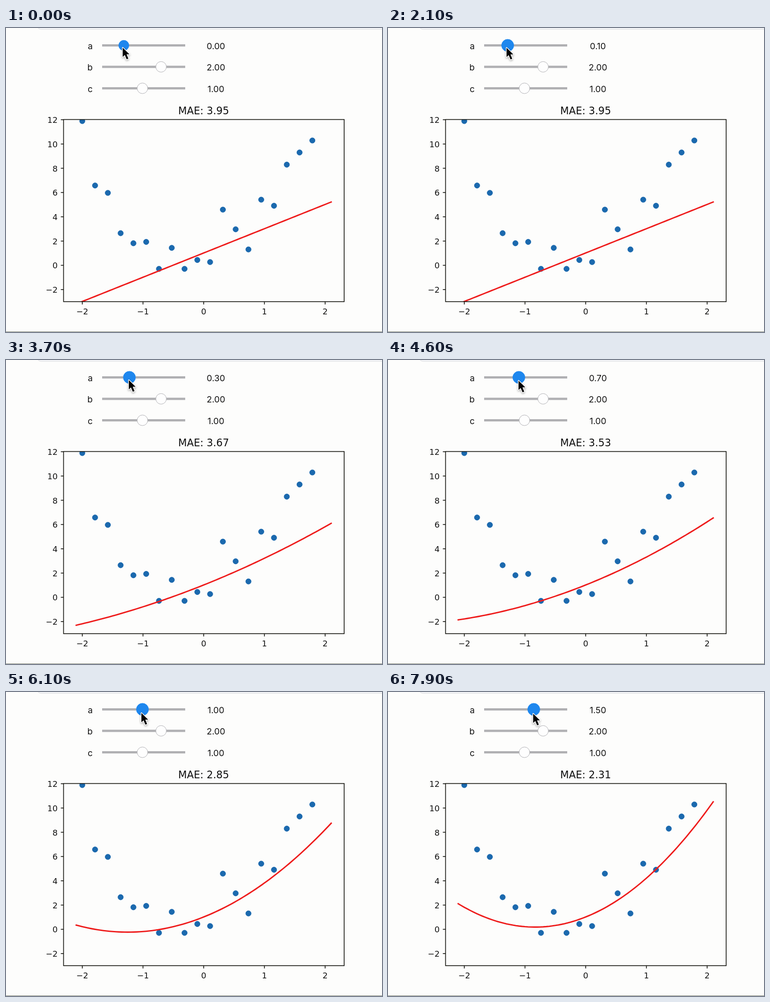
Animation of 833x673 px, one loop 8000 ms. Source, as an HTML page with a canvas:

```html
<!DOCTYPE html>
<html lang="en">
<head>
<meta charset="utf-8">
<title>Fitting a quadratic</title>
<style>
html, body { margin: 0; width: 100%; height: 100%; overflow: hidden; background: #fdfdfc; }
canvas { display: block; }
</style>
</head>
<body>
<canvas width="833" height="673"></canvas>
<script>
const ctx = document.querySelector('canvas').getContext('2d');
const LOOP = 8000, STEP = 100;
const DRAG_START = 2000;

// Measured samples, evenly spaced in x from -2 to 2; the last lies above the axes.
const points = [11.89, 6.58, 5.97, 2.65, 1.82, 1.93, -.29, 1.44, -.29, .44,
  .27, 4.59, 2.97, 1.31, 5.41, 4.91, 8.30, 9.30, 10.29, 13.3]
  .map((y, i) => [-2 + 4 * i / 19, y]);

// The hand nudges the slider, rests, then drags: time, value.
const drag = [[DRAG_START, .1], [3200, .1], [4600, .74], [6000, .97], [7900, 1.52]];

const px = x => 438 + 134.5 * x;
const py = y => 525.4 - 26.86 * y;
const model = (a, x) => a * x * x + 2 * x + 1;
const clamp = (v, min, max) => Math.min(max, Math.max(min, v));
const snap = v => Math.round(v * 10) / 10;

function handAt(t) {
  if (t < DRAG_START) return 0;
  const i = clamp(drag.findLastIndex(k => k[0] <= t), 0, drag.length - 2);
  const [[t1, v1], [t2, v2]] = drag.slice(i, i + 2);
  return v1 + (v2 - v1) * (t - t1) / (t2 - t1);
}

// Redraws fall further behind the slider while it moves.
const plotLag = t => clamp(.75 * (t - 3300), 300, 1000);

function text(str, x, y, font, align = 'center') {
  ctx.font = font;
  ctx.textAlign = align;
  ctx.fillStyle = '#111';
  ctx.fillText(str, x, y);
}

function circle(x, y, r, fill, stroke = fill) {
  ctx.beginPath();
  ctx.arc(x, y, r, 0, 2 * Math.PI);
  ctx.fillStyle = fill;
  ctx.fill();
  ctx.strokeStyle = stroke;
  ctx.lineWidth = 1;
  ctx.stroke();
}

function line(x1, y1, x2, y2) {
  ctx.beginPath();
  ctx.moveTo(x1, y1);
  ctx.lineTo(x2, y2);
  ctx.stroke();
}

function slider(name, value, y, knobRadius, ...colors) {
  const font = '19.3px Inter, "Liberation Sans", sans-serif';
  text(name, 192, y + 8, font, 'right');
  text(value.toFixed(2), 465, y + 8, font);
  ctx.fillStyle = '#b0b0b3';
  ctx.fillRect(213, y - 2.5, 184, 5);
  circle(261 + 41.3 * value, y, knobRadius, ...colors);
}

function pageEdges() {
  ctx.beginPath();
  ctx.roundRect(69.5, -20, 800, 23, 8);
  ctx.fillStyle = '#f5f6f8';
  ctx.fill();
  ctx.strokeStyle = '#d9dade';
  ctx.lineWidth = 1;
  ctx.stroke();
  ctx.fillStyle = '#75786a';
  ctx.fillRect(0, 672, 833, 1);
}

function axes() {
  const font = '18px "DejaVu Sans", sans-serif';
  const label = n => String(n).replace('-', '\u2212');
  ctx.strokeStyle = '#15150f';
  ctx.lineWidth = 1.7;
  ctx.strokeRect(127.5, 202.6, 621.7, 403.2);
  for (let x = -2; x <= 2; x++) {
    line(px(x), 606, px(x), 612);
    text(label(x), px(x), 634, font);
  }
  for (let y = -2; y <= 12; y += 2) {
    line(121.5, py(y), 127.5, py(y));
    text(label(y), 114.5, py(y) + 7, font, 'right');
  }
}

function plot(a) {
  ctx.save();
  ctx.beginPath();
  ctx.rect(127.5, 202.6, 621.7, 403.2);
  ctx.clip();
  for (const [x, y] of points) circle(px(x), py(y), 6, '#1b69ae');
  ctx.beginPath();
  for (let x = -2.1; x < 2.11; x += .05) ctx.lineTo(px(x), py(model(a, x)) - .5);
  ctx.strokeStyle = '#ee1c1c';
  ctx.lineWidth = 3.1;
  ctx.lineCap = 'square';
  ctx.stroke();
  ctx.restore();
  axes();
  const mae = points.reduce((sum, [x, y]) => sum + Math.abs(y - model(a, x)), 0) / points.length;
  text('MAE: ' + mae.toFixed(2), 437.8, 191, '22.3px "DejaVu Sans", sans-serif');
}

const arrow = new Path2D('M1 2v20.5l4.7-4.3 4.1 9.6 3.8-1.6-4-9.4H16z');

function pointer(x, y) {
  ctx.save();
  ctx.translate(x, y);
  ctx.lineJoin = 'round';
  ctx.strokeStyle = '#fff';
  ctx.lineWidth = 3;
  ctx.shadowColor = 'rgba(0,0,0,.35)';
  ctx.shadowBlur = 4;
  ctx.shadowOffsetY = 2;
  ctx.stroke(arrow);
  ctx.shadowColor = 'transparent';
  ctx.fillStyle = '#000';
  ctx.fill(arrow);
  ctx.restore();
}

function draw(now) {
  const t = Math.floor(now % LOOP / STEP) * STEP;
  const hand = handAt(t);
  ctx.fillStyle = '#fdfdfc';
  ctx.fillRect(0, 0, 833, 673);
  pageEdges();
  slider('a', snap(hand), 38.5, hand > 0 ? 13.5 : 11.3, '#1e87ee');
  slider('b', 2, 86, 11.7, '#fefefe', '#aeaeb2');
  slider('c', 1, 133.5, 11.7, '#fefefe', '#aeaeb2');
  plot(snap(handAt(t - plotLag(t))));
  pointer(257.5 + 41.5 * hand, 41.5 + 3 * hand);
  requestAnimationFrame(draw);
}
requestAnimationFrame(draw);
</script>
</body>
</html>
```
